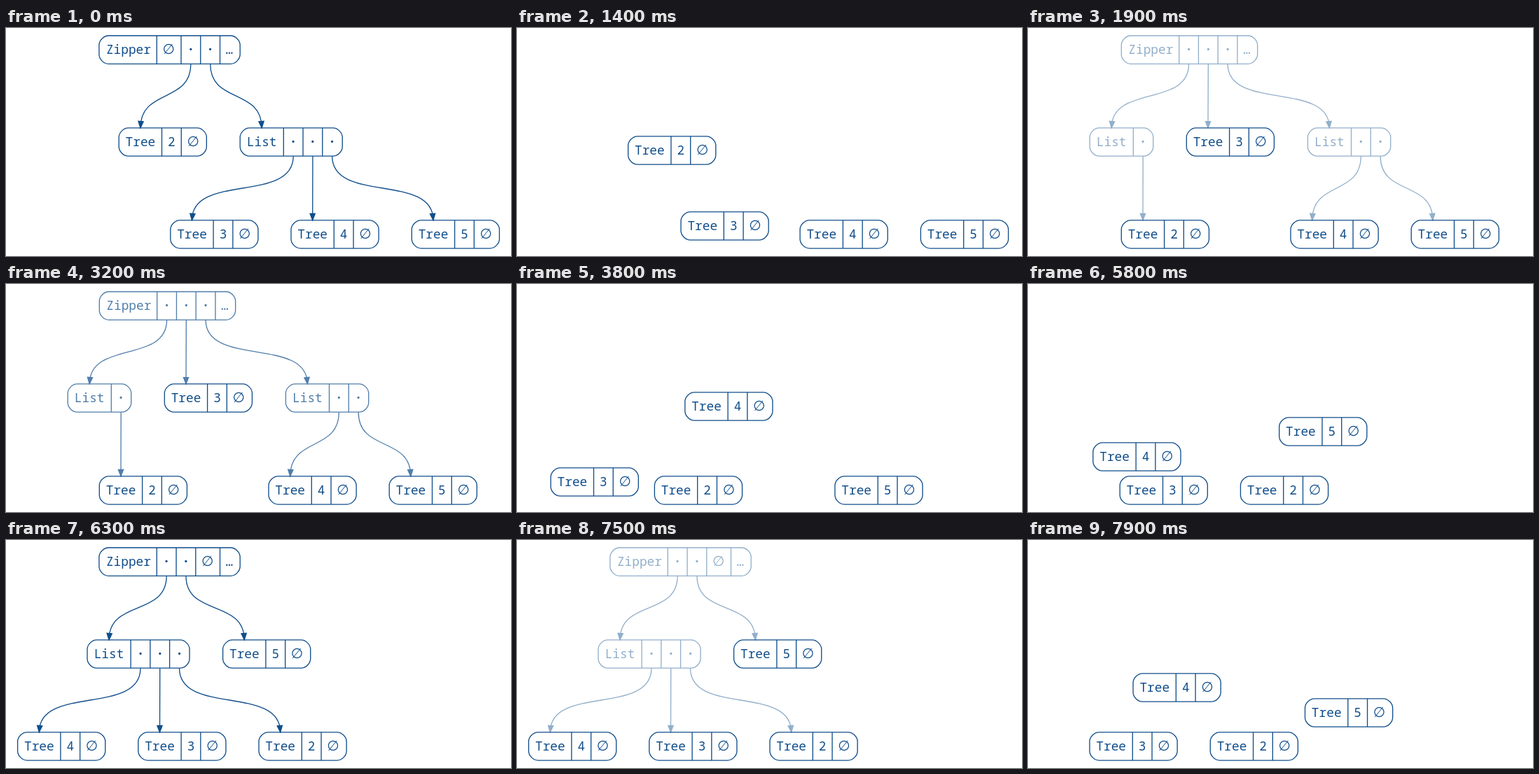
Animation, 721 px wide and 326 px high, one loop 8000 ms. Source, as an HTML page with a canvas:

```html
<!DOCTYPE html>
<html lang="en">
<head>
<meta charset="utf-8">
<title>Tree zipper</title>
<style>
  html, body { margin: 0; width: 100%; height: 100%; overflow: hidden; background: #fff; }
  canvas { display: block; }
</style>
</head>
<body>
<canvas id="stage" width="721" height="326"></canvas>
<script>
const ctx = document.getElementById('stage').getContext('2d');
const LOOP = 8000, STEP = 100, STEPS = 11;
const INK = [16, 78, 139];
const ROW = [11, 142.9, 274.8];
const HEIGHT = 40.3;
const MONO = '17.8px "Noto Sans Mono", "DejaVu Sans Mono", monospace';
const FONT = { '∅': '20px "DejaVu Sans", sans-serif', '·': 'bold ' + MONO };

// Cell widths and text centres, by label
const WIDTH = { Zipper: 82.4, List: 62.1, Tree: 61.3, '∅': 34.7, '…': 28.7 };
const CENTER = { Zipper: 42, List: 31, Tree: 30.7, '∅': 16.9, '…': 13.4 };
const widthOf = label => WIDTH[label] || 27.75;
const centerOf = label => CENTER[label] || 13.9;

const node = (x, row, cells, kids = []) => ({ x, y: ROW[row], cells: cells.split(' '), kids });
const tree = (n, x, row) => ({ ...node(x, row, `Tree ${n} ∅`), n });

// The focus moves from the first tree to the last; kids fill the dots in order
const layouts = [
  node(132.9, 0, 'Zipper ∅ · · …', [
    tree(2, 161.2, 1),
    node(334.2, 1, 'List · · ·', [tree(3, 234.8, 2), tree(4, 407, 2), tree(5, 579.3, 2)])
  ]),
  node(133.3, 0, 'Zipper · · · …', [
    node(88.2, 1, 'List ·', [tree(2, 133.3, 2)]),
    tree(3, 226.3, 1),
    node(399.4, 1, 'List · ·', [tree(4, 375, 2), tree(5, 547.2, 2)])
  ]),
  node(133.3, 0, 'Zipper · · · …', [
    node(60.5, 1, 'List · ·', [tree(3, 30.4, 2), tree(2, 202.7, 2)]),
    tree(4, 226.3, 1),
    node(399.4, 1, 'List ·', [tree(5, 444.6, 2)])
  ]),
  node(132.9, 0, 'Zipper · · ∅ …', [
    node(116, 1, 'List · · ·', [tree(4, 16.6, 2), tree(3, 188.8, 2), tree(2, 361, 2)]),
    tree(5, 309.6, 1)
  ])
];

// Transitions: start time, layout before, layout after
const moves = [[1100, 0, 1], [3200, 1, 2], [5300, 2, 3], [7400, 3, 2]];

const clamp = v => Math.max(0, Math.min(1, v));
const mix = (a, b, p) => a + (b - a) * p;

function setInk(strength) {
  const color = `rgb(${INK.map(c => Math.round(mix(255, c, strength)))})`;
  ctx.strokeStyle = ctx.fillStyle = color;
}

function roundBox(x, y, w, h) {
  const r = h / 3, k = r / 2, R = x + w, B = y + h;
  ctx.beginPath();
  ctx.moveTo(x + r, y);
  ctx.lineTo(R - r, y);
  ctx.bezierCurveTo(R - k, y, R, y + k, R, y + r);
  ctx.lineTo(R, B - r);
  ctx.bezierCurveTo(R, B - k, R - k, B, R - r, B);
  ctx.lineTo(x + r, B);
  ctx.bezierCurveTo(x + k, B, x, B - k, x, B - r);
  ctx.lineTo(x, y + r);
  ctx.bezierCurveTo(x, y + k, x + k, y, x + r, y);
  ctx.closePath();
}

function drawNode({ cells }, x, y) {
  let left = x;
  const seams = [];
  cells.forEach((label, i) => {
    ctx.font = FONT[label] || MONO;
    ctx.fillText(label, left + centerOf(label), y + 26);
    left += widthOf(label);
    if (i < cells.length - 1) seams.push(left);
  });
  const last = cells[cells.length - 1];
  const pad = last === '∅' ? 1.4 : last === '·' ? 0.7 : 0;
  roundBox(x, y, left + pad - x, HEIGHT);
  for (const s of seams) {
    ctx.moveTo(s, y);
    ctx.lineTo(s, y + HEIGHT);
  }
  ctx.stroke();
}

// A symmetric S-curve that leaves and arrives vertically, with an arrowhead
function drawEdge(x0, y0, x1, y1) {
  const dx = x1 - x0, reach = 46 + Math.abs(dx) * 0.15;
  ctx.beginPath();
  ctx.moveTo(x0, y0);
  ctx.bezierCurveTo(x0, y0 + reach, x1, y1 - reach, x1, y1);
  ctx.stroke();

  const len = 9.3, half = 3.6, s = len / (3 * reach);
  const lean = 3 * s * s * dx;
  const bx = x1 - lean, by = y1 - len, tilt = half * lean / len;
  ctx.beginPath();
  ctx.moveTo(x1, y1);
  ctx.lineTo(bx + half, by - tilt);
  ctx.lineTo(bx - half, by + tilt);
  ctx.closePath();
  ctx.fill();
  ctx.stroke();
}

// Everything but the trees: the zipper, its lists and the arrows
function drawFrame(parent) {
  drawNode(parent, parent.x, parent.y);
  let left = parent.x, next = 0;
  for (const label of parent.cells) {
    if (label === '·') {
      const kid = parent.kids[next++];
      drawEdge(left + centerOf(label), parent.y + HEIGHT, kid.x + centerOf(kid.cells[0]), kid.y);
      if (!kid.n) drawFrame(kid);
    }
    left += widthOf(label);
  }
}

const treesOf = item => item.n ? [item] : item.kids.flatMap(treesOf);

function draw(time) {
  const move = moves.filter(m => time >= m[0]).pop();
  const step = move ? Math.min(STEPS, Math.floor((time - move[0]) / STEP) + 1) : 0;
  const from = layouts[move ? move[1] : 0], to = layouts[move ? move[2] : 0];
  // Three equal phases: fade out, slide, fade in
  const phase = 3 * step / STEPS;
  const slide = clamp(phase - 1);
  const strength = phase < 1 ? 1 - phase : clamp(phase - 2);

  ctx.fillStyle = '#fff';
  ctx.fillRect(0, 0, 721, 326);
  ctx.lineWidth = 1.33;
  ctx.textAlign = 'center';
  if (strength > 0) {
    setInk(strength);
    drawFrame(phase < 1 ? from : to);
  }
  setInk(1);
  const goals = treesOf(to);
  for (const t of treesOf(from)) {
    const goal = goals.find(g => g.n === t.n);
    drawNode(t, mix(t.x, goal.x, slide), mix(t.y, goal.y, slide));
  }
}

const start = performance.now();
function tick() {
  draw((performance.now() - start) % LOOP);
  requestAnimationFrame(tick);
}
tick();
</script>
</body>
</html>
```
